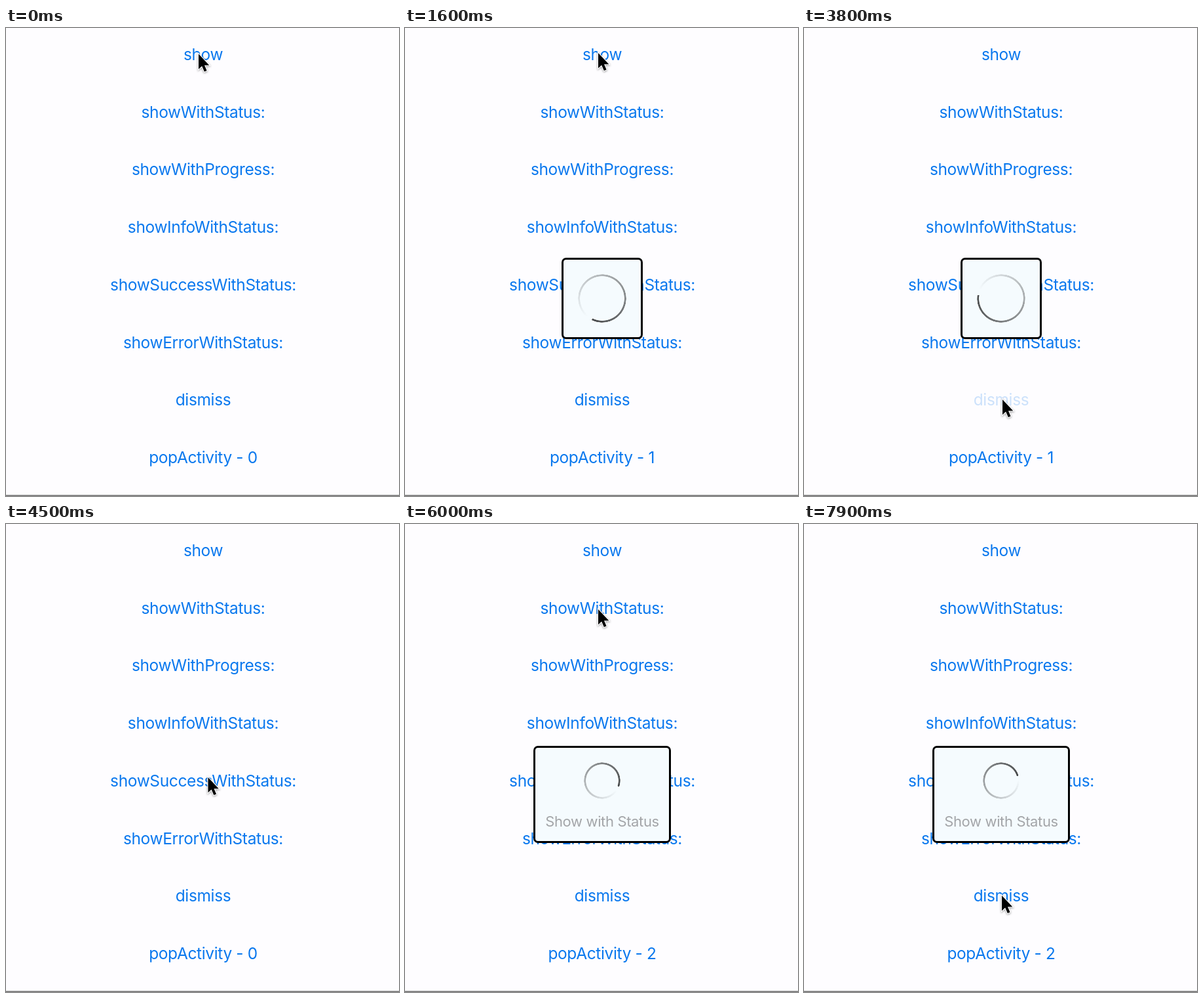
An HTML page that plays this animation: 600x713 px, repeating every 8 s.

```html
<!DOCTYPE html>
<html>
<head>
<meta charset="utf-8">
<title>Progress HUD demo</title>
<style>
  html, body { margin: 0; width: 100%; height: 100%; overflow: hidden; background: #fefdff; }
  body { position: relative; font: 24.5px/40px Inter, Roboto, sans-serif; letter-spacing: -.015em; }
  body > *, .hud > * { position: absolute; }
  .row { left: 1px; width: 600px; text-align: center; color: #0a78ee; white-space: pre; }
  .floor { left: 0; top: 711px; width: 600px; height: 2px; background: linear-gradient(#aaa 50%, #777 50%); }
  .hud { box-sizing: border-box; border: 3px solid #000; border-radius: 7px; background: #f5fbfe; }
  #plain { left: 239px; top: 350px; width: 124px; height: 124px; }
  #status { left: 196px; top: 338px; width: 210px; height: 148px; }
  .label { left: 0; top: 92px; width: 100%; text-align: center; font-size: 22px; color: #a3a5a8; white-space: nowrap; }
  .ring {
    --r: 37px;
    --band: radial-gradient(#0000 calc(var(--r) - 3.5px), #000 calc(var(--r) - 2.8px) calc(var(--r) - .6px), #0000 var(--r));
    left: calc(50% - var(--r)); width: calc(2 * var(--r)); height: calc(2 * var(--r));
    border-radius: 50%;
    background: conic-gradient(#0000 0 4%, #000000b4);
    -webkit-mask: var(--band);
    mask: var(--band);
  }
  #plain .ring { top: 22px; }
  #status .ring { --r: 28px; top: 22px; }
  #cursor { left: 0; top: 0; overflow: visible; filter: drop-shadow(0 1.5px 1.5px #0006); }
</style>
</head>
<body>
<div class="floor"></div>
<div class="hud" id="plain"><div class="ring"></div></div>
<div class="hud" id="status"><div class="ring"></div><div class="label">Show with Status</div></div>
<svg id="cursor" width="20" height="32">
  <path transform="scale(.93)" d="M0 0V25L5.5 20 9.5 29 13.5 27.3 9.7 18.5H17.5Z" stroke="#fff" stroke-width="2.4" paint-order="stroke"/>
</svg>
<script>
const LOOP = 8000, STEP = 100;
const labels = ['show', 'showWithStatus:', 'showWithProgress:', 'showInfoWithStatus:',
  'showSuccessWithStatus:', 'showErrorWithStatus:', 'dismiss', 'popActivity - 0'];
const rows = labels.map((text, i) => {
  const row = document.createElement('div');
  row.className = 'row';
  row.textContent = text;
  row.style.top = 20 + 87.7 * i + 'px';
  document.body.prepend(row);
  return row;
});
const byId = id => document.getElementById(id);
const clamp = v => Math.min(1, Math.max(0, v));
const progress = (t, start, length) => clamp((t - start) / length);

// row index, press time, release time
const taps = [[0, 980, 1050], [6, 3780, 3900], [1, 5560, 5690]];

const huds = [
  { el: byId('plain'), from: 1050, to: 3900, spin: 1028 },
  { el: byId('status'), from: 5690, to: Infinity, spin: 5695 }
];

const smooth = u => u * u * (3 - 2 * u);
const easeIn = u => u * u;
const easeOut = u => u * (2 - u);
// time, x, y, easing towards this point
const path = [
  [0, 294, 39.5, smooth], [200, 295, 38, smooth], [2950, 295, 38, smooth],
  [3600, 303, 566, smooth], [4200, 303, 566, smooth], [4500, 308.5, 386, easeIn],
  [5200, 295, 130, easeOut], [6350, 295, 130, smooth], [6800, 305, 563, smooth],
  [7300, 302, 566, smooth], [LOOP, 302, 566, smooth]
];

function cursorAt(t) {
  const i = path.findIndex(p => p[0] > t);
  const [t0, x0, y0] = path[i - 1], [t1, x1, y1, ease] = path[i];
  const u = ease((t - t0) / (t1 - t0));
  return [x0 + (x1 - x0) * u, y0 + (y1 - y0) * u];
}

function draw(t) {
  for (const [i, press, release] of taps) {
    const dim = t < press ? 1 : 0.2 + 0.8 * progress(t, release, 300);
    rows[i].style.opacity = dim;
  }
  const count = t >= 5690 ? 2 : t >= 1050 && t < 3900 ? 1 : 0;
  rows[7].textContent = 'popActivity - ' + count;

  for (const { el, from, to, spin } of huds) {
    const shown = progress(t, from, 150), gone = progress(t, to, 150);
    el.style.opacity = shown * (1 - gone);
    el.style.transform = `scale(${1 + 0.3 * (1 - easeOut(shown)) - 0.23 * gone})`;
    el.firstChild.style.transform = `rotate(${(t - spin) * 0.36}deg)`;
  }

  const [x, y] = cursorAt(t);
  byId('cursor').style.transform = `translate(${x}px, ${y}px)`;
}

function tick() {
  const t = performance.now() % LOOP;
  draw(Math.floor(t / STEP) * STEP);
  requestAnimationFrame(tick);
}
tick();
</script>
</body>
</html>
```
